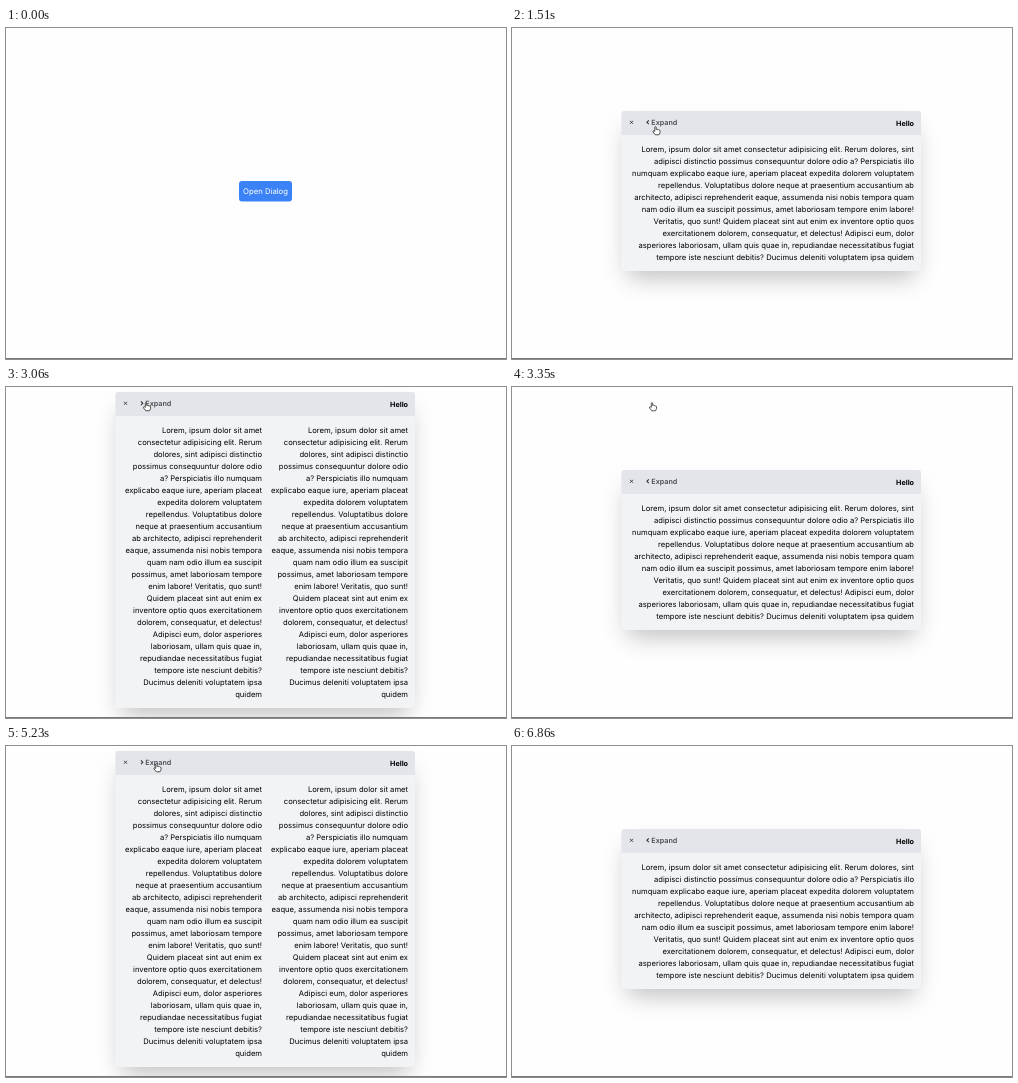
An HTML page with a canvas that plays this animation: 500 by 331 pixels, repeating every 7160 ms.

```html
<!DOCTYPE html>
<html lang="en">
<head>
<meta charset="utf-8">
<title>Expandable dialog</title>
<style>
  html, body { margin: 0; width: 100%; height: 100%; overflow: hidden; background: #fefefe; }
  canvas { display: block; }
</style>
</head>
<body>
<canvas width="500" height="331"></canvas>
<script>
const ctx = document.querySelector('canvas').getContext('2d');
ctx.textRendering = 'geometricPrecision';
const LOOP = 7160;
const OPEN_AT = 420;
const TOGGLES = [1620, 3350, 4440, 5740];

// Line breaks: | narrow columns, / wide column, # both
const TEXT = 'Lorem, ipsum dolor sit amet|consectetur adipisicing elit. Rerum|' +
  'dolores, sint/adipisci distinctio|possimus consequuntur dolore odio|' +
  'a? Perspiciatis illo/numquam|explicabo eaque iure, aperiam placeat|' +
  'expedita dolorem voluptatem#repellendus. Voluptatibus dolore|' +
  'neque at praesentium accusantium|ab/architecto, adipisci reprehenderit|' +
  'eaque, assumenda nisi nobis tempora|quam/nam odio illum ea suscipit|' +
  'possimus, amet laboriosam tempore|enim labore!/Veritatis, quo sunt!|' +
  'Quidem placeat sint aut enim ex|inventore optio quos/exercitationem|' +
  'dolorem, consequatur, et delectus!|Adipisci eum, dolor/asperiores|' +
  'laboriosam, ullam quis quae in,|repudiandae necessitatibus fugiat#' +
  'tempore iste nesciunt debitis?|Ducimus deleniti voluptatem ipsa|quidem';
const WIDE = TEXT.split(/[\/#]/).map(line => line.replaceAll('|', ' '));
const NARROW = TEXT.split(/[|#]/).map(line => line.replaceAll('/', ' '));

// Pointer stops: time, x, y
const POINTER = [
  [110, 274, 168], [420, 266.5, 161], [830, 266.5, 161], [1510, 144.5, 102.5],
  [2350, 144.5, 102.5], [2750, 135, 50], [3060, 141, 19.5], [3400, 141, 19.5],
  [4030, 159, 100], [4340, 160.5, 102], [4630, 160.5, 102], [5230, 151.5, 21.5],
  [5790, 151.5, 21.5], [6430, 160, 102], [6540, 160, 102], [6860, 260, 190]
];

function box(x, y, w, h, radius, color) {
  ctx.fillStyle = color;
  ctx.beginPath();
  ctx.roundRect(x, y, w, h, radius);
  ctx.fill();
}

function label(text, x, y, color, size, weight = 400, align = 'left') {
  ctx.font = `${weight} ${size}px Inter, sans-serif`;
  ctx.textAlign = align;
  ctx.fillStyle = color;
  ctx.fillText(text, x, y);
}

function stroke(path, color, width) {
  ctx.strokeStyle = color;
  ctx.lineWidth = width;
  ctx.stroke(new Path2D(path));
}

function paragraph(lines, right, top) {
  lines.forEach((line, i) => label(line, right, top + i * 12, '#000', 7.64, 400, 'right'));
}

function drawButton() {
  box(233, 153, 53, 20.5, 3, '#3b82f6');
  label('Open Dialog', 259.5, 166.2, '#fff', 7.75, 400, 'center');
}

function drawDialog(expanded) {
  const top = expanded ? 5 : 83;
  const height = expanded ? 316 : 160;

  ctx.save();
  ctx.shadowColor = 'rgba(0,0,0,.25)';
  ctx.shadowBlur = 25;
  ctx.shadowOffsetY = 12.5;
  box(115.5, top + 6, 287.5, height - 12, 3, '#f3f4f6');
  ctx.restore();

  box(109.5, top, 299.5, height, 3, '#f1f3f5');
  box(109.5, top, 299.5, 24, [3, 3, 0, 0], '#e3e5ea');

  const y = top + 11.3;
  stroke(`M118 ${y - 1.5}l3 3m0-3l-3 3`, '#333', 0.9);
  stroke(expanded ? `M134.9 ${y - 1.9}l1.9 1.9l-1.9 1.9` : `M136.8 ${y - 1.9}l-1.9 1.9l1.9 1.9`, '#333', 1.1);
  label('Expand', 139.3, top + 13.8, '#4a4b50', 7.2, 600);
  label('Hello', 402, top + 15.4, '#000', 7.2, 700, 'right');

  if (expanded) {
    paragraph(NARROW, 256, top + 41.2);
    paragraph(NARROW, 402, top + 41.2);
  } else {
    paragraph(WIDE, 402, top + 41.2);
  }
}

const HAND = new Path2D('M-2 1V-4Q-1.2-5.4-.4-4V-1.2Q.6-2 1.3-1Q2.3-1.5 2.8-.5' +
  'Q4-.8 4.2.5V2.5L3 5H-1.5L-4.2 1.5Q-4.3 0-3 .3Z');

function drawPointer(time) {
  const next = POINTER.findIndex(stop => stop[0] > time);
  if (next < 1) return;
  const [t0, x0, y0] = POINTER[next - 1];
  const [t1, x1, y1] = POINTER[next];
  const p = (time - t0) / (t1 - t0);
  const ease = p * p * (3 - 2 * p);

  ctx.save();
  ctx.translate(x0 + (x1 - x0) * ease, y0 + (y1 - y0) * ease);
  ctx.scale(0.85, 0.85);
  ctx.fillStyle = '#fff';
  ctx.fill(HAND);
  ctx.strokeStyle = '#222';
  ctx.lineWidth = 0.9;
  ctx.stroke(HAND);
  ctx.restore();
}

function draw() {
  const time = performance.now() % LOOP;
  ctx.fillStyle = '#fefefe';
  ctx.fillRect(0, 0, 500, 331);
  if (time < OPEN_AT) drawButton();
  else drawDialog(TOGGLES.filter(t => t <= time).length % 2 === 1);
  ctx.fillStyle = '#77787a';
  ctx.fillRect(0, 330, 500, 1);
  drawPointer(time);
  requestAnimationFrame(draw);
}
draw();
</script>
</body>
</html>
```
